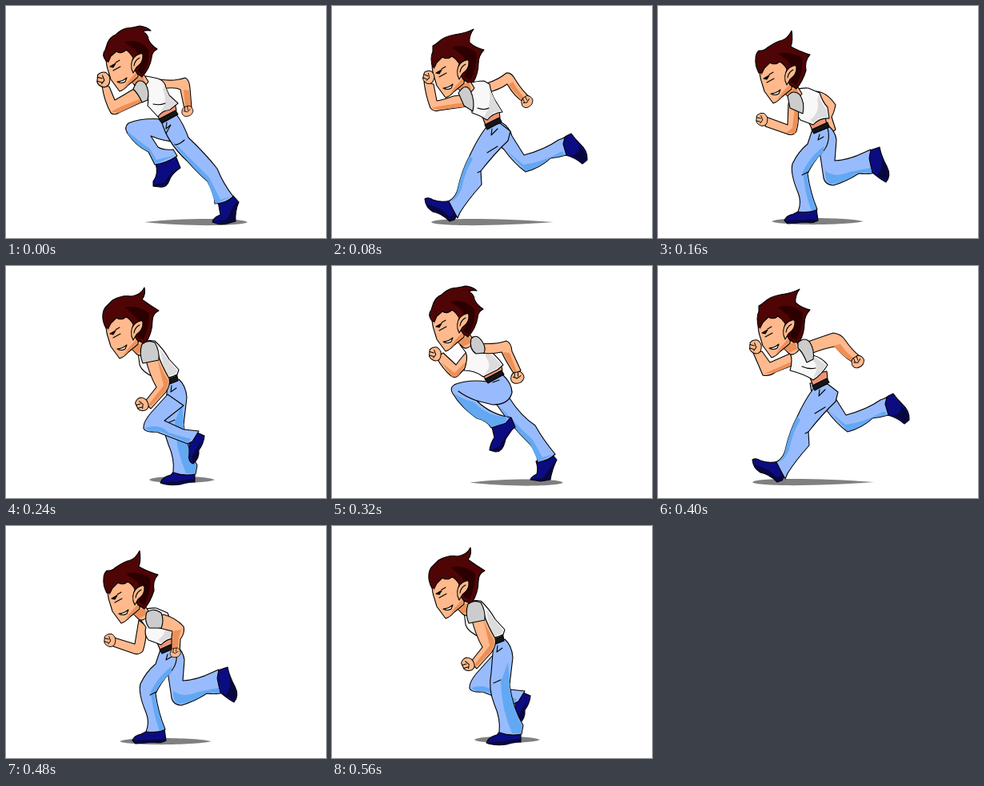
An HTML page with a canvas that plays this animation: 400 px wide and 291 px high, repeating every 0.64 s.

```html
<!DOCTYPE html>
<html lang="en">
<head>
<meta charset="utf-8">
<title>Runner</title>
<style>
html, body { margin: 0; width: 100%; height: 100%; overflow: hidden; background: #fff; }
canvas { display: block; }
</style>
</head>
<body>
<canvas id="stage" width="400" height="291"></canvas>
<script>
const ctx = document.getElementById('stage').getContext('2d');
const STEP = 80;

// Lower case keys are outlined fills, upper case keys are plain shading.
const INK = {
  s: '#ffb98c', S: '#ec9058', j: '#98bbfd', J: '#63a8f2', b: '#0c0c82', B: '#08083f',
  w: '#f8f8f8', g: '#cccccc', G: '#dcdcdc', k: '#161616', h: '#4f0505', H: '#2c0000',
  r: '#ee9474', R: '#dc2f25'
};

const HAIR = [
  ['hM125 69Q119 61 124 55L127 46Q130 39 137 36Q143 30 150 28Q160 27 167 25Q176 26 181 31Q175 30 171 32Q178 36 178 42Q181 49 189 54Q182 58 182 65Q180 78 170 89L164 85L158 76L159 65Q155 58 150 55Q144 61 138 57L131 63L128 70Z',
   'HM148 45Q166 41 178 54Q181 68 171 86L165 82Q170 66 162 55Z'],
  ['hM126 77Q122 66 126 57L126 50Q130 48 132 46Q140 38 153 36Q168 34 177 29Q171 37 172 46Q180 53 190 55Q183 62 183 72Q183 84 177 95L170 96L164 92L158 83L159 72Q155 66 150 63Q144 68 138 64L131 71L128 77Z',
   'HM150 52Q166 46 181 59Q181 77 173 93L165 89Q171 74 163 62Z'],
  ['hM126 84Q121 74 122 66Q122 60 126 56Q132 57 137 52Q147 45 155 43Q162 41 167 31Q169 42 166 51Q179 58 190 61Q183 68 185 81Q181 94 173 104L165 99L160 90L161 79Q157 72 152 70Q146 75 140 71L133 78L130 84Z',
   'HM150 60Q165 56 180 65Q182 83 173 99L166 95Q172 82 164 70Z'],
  ['hM125 78Q120 69 121 60Q122 53 127 49L133 43Q145 36 157 38Q169 36 173 27Q175 36 170 42Q181 50 191 56Q183 60 183 69Q183 84 174 98L164 93L158 84L159 73Q155 66 150 64Q144 69 138 65L131 72L128 78Z',
   'HM149 52Q164 48 179 59Q179 76 172 92L164 89Q171 75 162 64Z']
];
const HEAD_AT = [[0, 0], [0, 8], [2, 15], [0, 9]];

const FACE = [
  'sM156 94L170 82L178 95Q170 106 164 102Z',
  'SM157 95L171 87L174 96L164 101Z',
  'sM125 64Q125 74 128 82L131 92L142 107Q148 105 153 99L165 89L165 66L150 52L132 57Z',
  'SM146 104L153 98L164 88L163 83L153 94Z',
  'RM125 67L129 63L128 72Z',
  'kM130 76L137 72L134 77Z',
  '-M134 81L143 76M137 71L142 68',
  'wM139 95Q145 95 151 90L149 95Q144 98 139 95Z'
];
const EAR = ['sM157 79Q155 67 163 62Q170 58 171 61Q172 71 163 77L159 84Z', '-M160 75Q161 68 167 65'];

const FIST = ['sM-8 -5Q-4 -10 2 -9Q9 -5 8 2Q8 9 1 10Q-6 9 -8 4Z', '-M-8 -2L-2 -1M-8 3L-2 4M-2 -5L1 1L-2 6'];

const TRAIL_LEG = [
  'bM286 168L293 163L299 160Q304 167 310 173Q320 182 319 193L313 198Q304 190 292 187Z',
  'BM309 175Q319 184 318 193L313 196Q304 189 297 187Q309 188 309 175Z',
  'jM195 147L212 146Q222 152 225 163L240 187Q266 180 283 168L291 165L289 173L293 187Q283 190 273 191Q260 203 242 208Q228 198 215 180L198 165Z',
  'JM219 182L239 199Q261 197 288 182L291 187L274 190Q258 204 242 207Z'
];
const LEAD_LEG = [
  'bM116 242Q120 239 126 243Q137 247 148 244L157 262L153 268L147 270Q137 260 126 258Q117 253 116 242Z',
  'BM117 248Q133 251 147 264L156 260L153 267L147 269Q136 259 125 257Z',
  'jM192 153L210 147L223 157L220 169Q204 184 186 207L187 224Q170 243 160 259L157 266Q151 255 146 245Q156 239 158 226Q163 205 172 188Q181 168 192 153Z',
  'JM172 188L176 192Q166 208 162 229Q158 240 149 246Q156 238 158 226Q163 205 172 188Z',
  '-M200 154L199 162L207 154M194 184L207 176M182 209L186 207'
];
const DOWN_LEGS = [
  'bM262 182L277 177Q279 188 286 201Q292 213 285 221Q276 216 266 207Z',
  'BM279 188Q293 213 285 219L274 212Q282 205 279 188Z',
  'jM197 156L213 150Q222 158 223 168L221 194Q239 193 257 184L266 180L264 191L268 210Q259 211 251 210Q236 220 219 225Q209 224 207 216L202 182Z',
  'JM209 207Q221 216 240 208L266 203L267 209L251 209Q233 222 217 223Q209 223 209 207Z',
  'bM158 269Q160 263 169 261L179 256L198 254L200 269Q193 273 185 271L162 273Z',
  'BM159 269L183 268L200 267L198 271L161 273Z',
  'jM193 155L212 153Q217 172 204 185Q194 196 187 210Q190 233 199 255Q190 260 175 258Q180 246 175 234Q165 210 168 198Q175 183 187 173Z',
  'JM207 176Q189 190 181 208Q184 237 192 257L198 255Q190 235 186 210Q193 196 207 183Z',
  '-M202 161L200 168L207 164M180 212L188 208'
];
const SWING_LEG = [
  'bM229 222L239 209L248 213Q247 223 241 231Q242 241 234 248Q227 245 229 235Z',
  'BM244 219L240 232Q241 242 234 247L232 239Z',
  'jM202 161L184 181Q171 195 172 204Q175 209 188 208Q206 215 227 223L233 220L241 207L222 205L198 194L222 175Z',
  'JM174 203Q193 197 203 209L231 217L228 222L194 208Q180 209 174 203Z'
];
const STAND_LEG = [
  'bM193 272Q195 265 206 262L212 255L236 258L236 271Q227 270 218 274Q203 276 193 272Z',
  'BM194 271Q210 272 220 269L236 267L235 271L218 274Q203 275 194 271Z',
  'jM202 147L216 142Q225 150 226 165L222 199Q226 229 239 250L237 261Q223 264 209 259Q211 242 203 224Q195 204 199 184Z',
  'JM220 171L211 196Q212 230 225 260L236 260L238 251Q224 228 222 199Z',
  '-M207 150L206 158L213 153M202 197L211 193'
];

const WAIST = ['rM187 136L209 131L210 141L192 150Z', 'kM191 149L209 140L212 145L194 155Z'];
const UPRIGHT_TORSO = WAIST.concat([
  'wM161 102Q169 95 190 94L197 98Q199 111 205 120L213 133Q201 134 194 143Q185 137 175 134L174 121Z',
  'GM198 106L205 121L212 132L201 134L194 142L190 139Q199 126 197 107Z',
  '-M182 128Q190 131 196 128'
]);
const LOW_TORSO = [
  'rM187 142L209 139L211 149L193 156Z',
  'kM192 155L212 146L214 152L195 160Z',
  'wM163 110Q173 102 188 103L202 109Q206 121 212 127L214 141Q202 140 194 149L178 143Q172 136 175 127Z',
  'GM201 112Q205 125 211 130L212 139Q201 139 194 147L190 143Q203 133 199 118Z'
];
const PASS_TORSO = [
  'sM202 116L212 128L214 137L206 139Z',
  'kM199 143L214 138L215 144L202 149Z',
  'wM164 99Q172 92 186 94Q196 103 204 117L216 130L214 136Q201 143 186 140Q170 133 167 124Z',
  'GM193 105L204 119L214 131L211 136L199 139Z'
];
const PASS_ARM = [
  'sM174 114L190 111Q195 126 204 141Q206 149 200 158L181 179L173 171L188 152Q179 136 174 114Z',
  'SM188 112Q193 128 202 142Q204 149 199 157L181 176L178 174L197 150Z',
  'f170 173 -25 .9',
  'gM170 98Q178 92 186 96Q192 106 191 118L171 122Q166 110 170 98Z'
];
const LEAN_TORSO = [
  'rM185 131L211 121L213 131L192 142Z',
  'kM191 142L212 131L215 136L195 147Z',
  'wM160 99Q166 89 176 88L190 91Q199 94 200 103L204 112L215 122L205 130Q195 131 190 139L177 125Q180 112 172 104Z',
  'GM198 99L204 113L214 122L204 130L193 132Q203 121 196 105Z',
  '-M184 123Q192 125 199 122'
];

const shifted = (x, y, items) => ({ at: [x, y], items });

// Shadows: left end, two upper control points, right end, height on the stage.
const POSES = [
  { hair: 0, shadow: [173, 220, 295, 302, 271], back: [
    'sM192 92Q210 95 224 90Q229 92 230 103L232 128L223 129L218 105Q211 101 195 104Z',
    'SM222 105L229 106L231 126L224 128Z', 'f227 132 75 .75',
    'bM187 197L212 188L218 203Q207 210 204 219Q201 228 192 227L184 226L184 220Q191 211 187 197Z',
    'BM185 224L198 222Q204 209 216 203L204 217Q201 227 185 226Z',
    'jM196 142Q170 140 153 147Q147 152 152 160Q163 176 178 183L186 199Q201 197 214 188L209 180Q196 181 190 177L181 163Q200 171 217 170L212 138Z',
    'JM152 157Q164 168 180 179L188 193L212 187L187 198L179 183Q163 176 152 160Z',
    'bM258 271Q259 265 268 262L265 245L284 238L291 246Q286 257 287 270L276 273Q267 275 258 271Z',
    'BM259 270L276 268L285 249L290 245L286 269L276 273Z',
    'jM194 143L213 136Q222 148 228 165Q250 186 264 204Q271 222 284 239Q275 248 261 248Q261 238 252 220Q241 211 226 194Q201 171 194 143Z',
    'JM205 166Q235 196 254 215L268 243L282 239L262 248L252 220Q225 195 205 166Z',
    '-M201 146L200 154L206 149L200 160M223 168Q217 174 211 174'].concat(LEAN_TORSO),
    front: ['sM170 103L158 105Q147 112 136 118L129 101L120 100Q123 120 131 134Q135 138 143 133L173 119Z',
    'SM132 133Q138 128 149 124L172 115L172 119L141 134Z', 'f122 92 5 .98',
    'gM163 96Q168 91 174 97Q180 107 177 118L170 121Q166 111 159 104Z'] },

  { hair: 1, shadow: [124, 127, 205, 277, 271], back: [
    'sM193 97Q207 93 218 84Q224 83 229 92Q238 107 248 115L240 121Q228 114 219 98Q209 105 196 108Z',
    'SM220 99L226 95Q234 109 243 117L239 120Z', 'f244 120 55 .8'].concat(TRAIL_LEG, LEAD_LEG, UPRIGHT_TORSO),
    front: ['sM168 111L152 113Q138 118 131 119L127 98L115 95Q117 112 123 128Q127 133 134 131L169 126Z',
    'SM124 128Q140 124 169 121L169 126L134 130Z', 'f121 89 15 .85',
    'gM162 104Q168 98 173 106Q179 119 176 132L165 125L158 109Z'] },

  { hair: 2, shadow: [142, 150, 235, 257, 270], back: [
    'sM198 107Q211 108 222 124Q220 134 217 139L222 155L215 160L208 148L210 130L199 120Z'].concat(DOWN_LEGS, LOW_TORSO),
    front: ['sM163 122L175 124Q177 144 173 157Q169 164 160 160L134 151L135 139L162 149Z',
    'SM171 126L175 128Q176 149 171 160L160 159L168 153Z', 'f130 142 5 .85',
    'gM162 113Q169 104 177 111Q184 121 181 135L165 128Z'] },

  { hair: 3, shadow: [179, 183, 250, 261, 268], back: STAND_LEG.concat(SWING_LEG, PASS_TORSO), front: PASS_ARM },

  { hair: 0, shadow: [172, 215, 283, 289, 271.5], back: [
    'sM174 103L167 109Q160 117 155 124L139 109L130 114Q139 130 149 138Q155 142 160 135L174 120Z',
    'SM137 121L153 134L171 117L158 137L150 139Z', 'f129 110 5 .9',
    'bM248 268Q249 264 256 261Q258 254 255 245L274 235L281 243Q275 255 273 268L261 270Z',
    'BM249 267L264 266L276 248L279 244L272 268L261 270Z',
    'jM203 155L225 157L222 166Q236 188 254 200Q264 218 279 236Q270 245 257 246Q257 237 248 224Q224 201 206 174Z',
    'JM210 176Q232 201 251 218L263 240L277 236L258 246L248 224Q224 201 210 176Z',
    'bM199 198L224 190L229 202Q218 209 216 221Q213 234 204 233L197 231Q198 222 203 215Z',
    'BM198 230L209 227Q217 211 228 202L217 218Q214 233 204 232Z',
    'jM194 145L213 136Q225 147 225 159Q221 174 201 174L181 169Q198 186 223 190L217 197L199 203Q194 194 181 191Q161 177 151 160Q146 152 155 148Q172 142 194 145Z',
    'JM153 160Q165 168 178 171Q194 189 219 189L216 197L199 202Q192 193 181 191Q162 178 153 160Z',
    '-M158 157Q167 164 181 169M201 146L209 143'].concat(LEAN_TORSO.slice(0, 2), [
    'wM160 99Q166 89 177 89L190 101Q204 110 214 124L207 130L189 139Q179 131 165 131Q171 115 167 108Z',
    'GM192 107Q204 114 212 124L204 130L189 137Q202 127 192 114Z']),
    front: ['sM180 97Q204 99 218 94Q224 96 225 107L236 131L228 136Q217 119 212 108Q200 111 184 109Z',
    'SM213 108L222 109L231 132L228 134Z', 'f232 140 80 .87',
    'gM174 91Q181 84 188 95Q193 103 190 109L180 110Q171 104 174 91Z'] },

  { hair: 1, shadow: [118, 121, 200, 270, 271], back: [
    'sM167 109L140 121L130 107L119 109Q126 125 131 137Q139 139 147 133L170 124Z',
    'SM133 135L169 119L169 124L145 134Z',
    shifted(-5, 0, TRAIL_LEG), shifted(2, 1, LEAD_LEG), shifted(2, 1, WAIST),
    'wM161 102Q170 96 186 95L194 112Q205 115 212 124Q205 136 194 143Q184 136 165 131Q169 118 165 109Z',
    'GM195 114L210 124L203 135L193 141Q203 127 194 119Z', '-M180 126Q189 130 197 128'],
    front: ['f122 101 5 .9',
    'sM187 95Q207 88 219 84Q229 85 234 93Q243 106 252 113L244 121Q230 113 222 101Q208 103 191 110Z',
    'SM219 100L228 98Q237 111 247 117L243 120Q230 113 219 100Z', 'f250 120 60 .85',
    'gM175 96Q184 88 190 96Q196 106 194 117L186 121Q181 108 175 103Z'] },

  { hair: 2, shadow: [142, 150, 235, 257, 270], back: [
    'sM166 118L176 126Q175 146 171 157Q166 163 157 159L134 151L135 140L161 148Z',
    'f130 143 5 .85'].concat(DOWN_LEGS, LOW_TORSO),
    front: ['sM180 115L197 111Q212 115 222 126Q224 134 218 142L217 158L207 158L207 139L208 132L184 126Z',
    'SM208 132L219 130L216 140L215 157L208 156Z', 'f212 159 85 .7',
    'gM176 108Q185 102 194 109Q198 119 194 128L179 128Q172 119 176 108Z'] },

  { hair: 3, shadow: [178, 182, 250, 260, 268], back: SWING_LEG.concat(STAND_LEG, PASS_TORSO), front: PASS_ARM }
];

function paint(item) {
  if (item.items) return paintAt(item.at, item.items);
  const key = item[0];
  const rest = item.slice(1);
  if (key === 'f') return paintFist(...rest.split(' ').map(Number));
  const path = new Path2D(rest);
  if (key !== '-') {
    ctx.fillStyle = INK[key];
    ctx.fill(path);
  }
  if (key === key.toLowerCase()) ctx.stroke(path);
}

function paintAt([x, y], items) {
  ctx.save();
  ctx.translate(x, y);
  items.forEach(paint);
  ctx.restore();
}

function paintFist(x, y, turn, size) {
  ctx.save();
  ctx.translate(x, y);
  ctx.rotate(turn * Math.PI / 180);
  ctx.scale(size, size);
  FIST.forEach(paint);
  ctx.restore();
}

function paintShadow([left, a, b, right, y]) {
  ctx.fillStyle = '#808080';
  ctx.beginPath();
  ctx.moveTo(left, y);
  ctx.bezierCurveTo(a, y - 5.5, b, y - 5.5, right, y);
  ctx.bezierCurveTo(b, y + 5.5, a, y + 5.5, left, y);
  ctx.fill();
}

function draw(pose) {
  ctx.fillStyle = '#fff';
  ctx.fillRect(0, 0, 400, 291);
  paintShadow(pose.shadow);
  ctx.strokeStyle = '#000';
  ctx.lineWidth = 1.1;
  ctx.lineJoin = ctx.lineCap = 'round';
  const at = HEAD_AT[pose.hair];
  pose.back.forEach(paint);
  paintAt(at, FACE);
  HAIR[pose.hair].forEach(paint);
  paintAt(at, EAR);
  pose.front.forEach(paint);
}

const start = performance.now();
function tick() {
  const time = Math.max(0, performance.now() - start);
  draw(POSES[Math.floor(time / STEP) % POSES.length]);
  requestAnimationFrame(tick);
}
tick();
</script>
</body>
</html>
```
